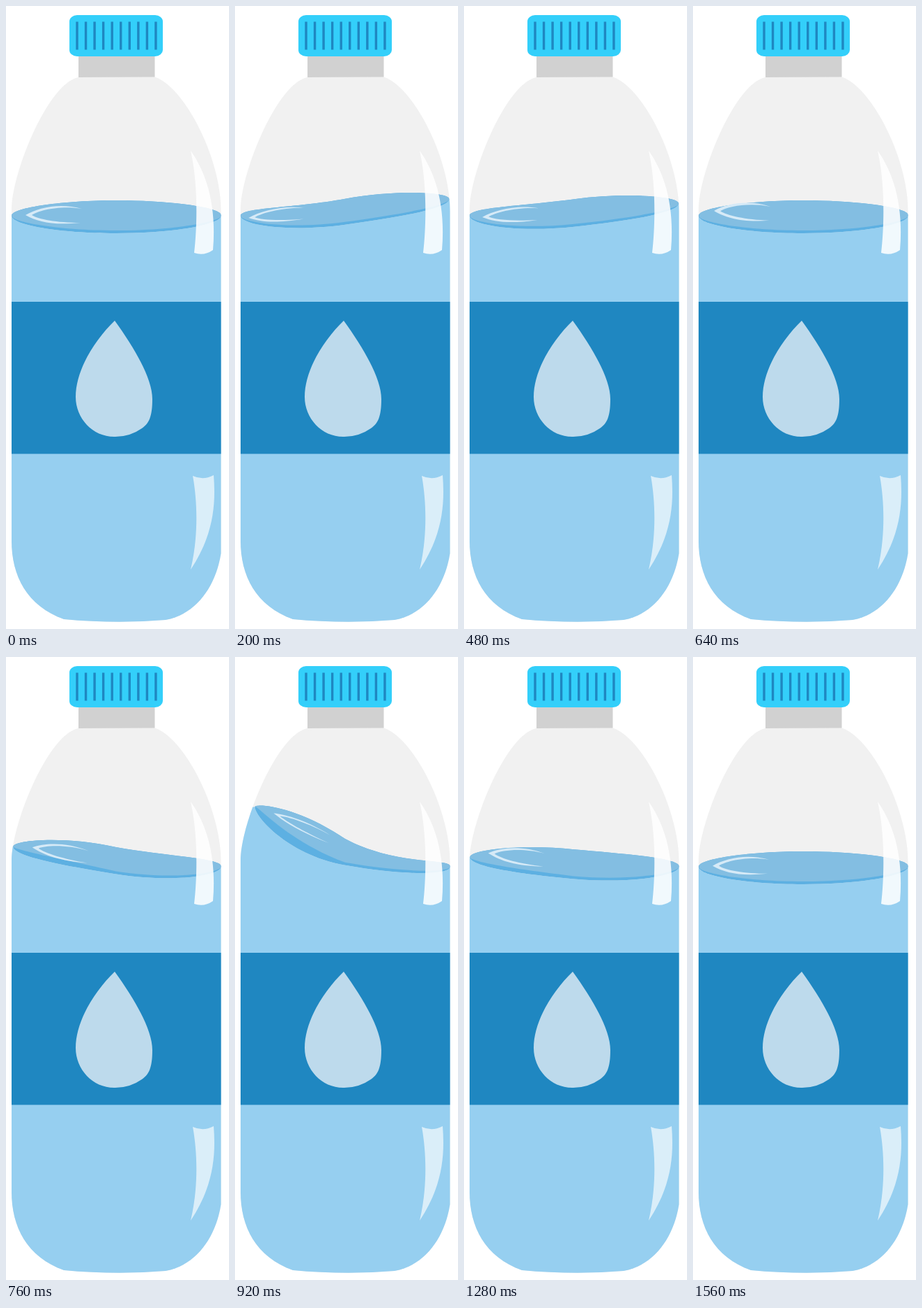
An HTML page that plays this animation: 320 px wide and 891 px high, repeating every 1.6 s.

```html
<!DOCTYPE html>
<html lang="en">
<head>
<meta charset="utf-8">
<title>Water bottle</title>
<style>
  html, body { margin: 0; width: 100%; height: 100%; overflow: hidden; background: #fff; }
  svg { display: block; width: 100%; height: 100%; }
</style>
</head>
<body>
<svg viewBox="0 0 320 891">
  <clipPath id="inside"><use href="#bottle"/></clipPath>
  <rect x="104" y="70" width="109.5" height="33" fill="#d1d1d1"/>
  <rect x="91" y="13" width="134" height="59" rx="11" ry="9" fill="#33cffa"/>
  <path id="ridges" stroke="#1f87c1" stroke-width="3.4"/>
  <path id="bottle" fill="#f1f1f1" d="M104 102L214 101.5C256 116 308.5 217 308.5 293V783C301 830 273 870 229 878Q158 884 83 877C30 858 8 815 8 765V290C8 240 60 110 104 102Z"/>
  <g clip-path="url(#inside)">
    <path id="water" fill="#96cff0"/>
    <path id="rim" fill="#5db0e2"/>
    <path id="surface" fill="#83bee2"/>
    <path id="glint" fill="#d6eaf7" d="M81-9C50-18 18-11 0 0C18 10 40 15 79 11C45 11 18 6 9 0C20-7 50-14 81-9Z"/>
  </g>
  <rect x="8" y="423" width="300.5" height="217.5" fill="#1f87c1"/>
  <path fill="#bddaec" d="M156 450C185 490 210 533 210 562C210 588 205 597 195 604Q178 616 157 616C125 617 100 590 100 559C100 520 128 477 156 450Z"/>
  <g fill="#fff">
    <path opacity=".87" d="M265 207C290 242 302 290 297 349Q284 358 270 353C275 310 275 250 265 207Z"/>
    <path opacity=".65" d="M268 672Q283 679 298 671C301 710 299 755 265 806C276 760 275 710 268 672Z"/>
  </g>
</svg>
<script>
const LOOP = 1600;
const set = (id, name, value) => document.getElementById(id).setAttribute(name, value);

// Rises from 0 to 1 at the peak, then falls back to 0
function swell(t, start, peak, end, power = 1.15) {
  const u = t < peak ? (t - start) / (peak - start) : (end - t) / (end - peak);
  return Math.max(0, u) ** power;
}

// left and right: how far each end of the surface has risen
function drawWater(left, right) {
  const rise = left + right, dir = left > right ? 1 : -1;
  const lx = 8 + .0028 * left ** 2, ly = 300 - left;
  const rx = 309 - .0028 * right ** 2, ry = 299.5 - right;

  const topY = 278 - .21 * left - .1 * right;
  const slope = .57 * rise * dir;
  const leftSlope = slope, rightSlope = slope * (dir > 0 ? .8 : 1);
  const lip = r => 12 - .08 * r;
  const top = `M${lx} ${ly}C${lx} ${ly - lip(left)} 85 ${topY - leftSlope} 158 ${topY}`
    + `C231 ${topY + rightSlope} ${rx} ${ry - lip(right)} ${rx} ${ry}`;

  const bend = (.6 * rise - .005 * rise ** 2) * dir;
  const bottom = (inset, thick) => {
    const y = 325 - .6 * rise + .0033 * rise ** 2;
    return `C${rx} ${ry + 13 - inset} 242 ${y + bend - inset} 158 ${y - inset}`
      + `C75 ${y - bend - thick} ${lx} ${ly + 13 - thick} ${lx} ${ly}`;
  };

  const outer = bottom(0, 0);
  set("rim", "d", top + outer + "Z");
  set("surface", "d", top + bottom(4, 4 + .18 * left) + "Z");
  set("water", "d", `M320 ${ry}L${rx} ${ry}${outer}L0 ${ly}V891H320Z`);
}

// The glint settles more slowly than the water
function drawGlint(t, left, right) {
  const lift = swell(t, 540, 925, LOOP, 1.9);
  const x = 28 + 28 * lift - 11 * swell(t, 0, 250, 540);
  const y = 299 - 77 * lift + .17 * right;
  const tilt = 37 * lift - .3 * right;
  const half = 10 - .045 * left - .1 * right;
  set("glint", "transform", `matrix(1 ${tilt / 80} 0 ${half / 10} ${x} ${y})`);
}

function frame() {
  const t = performance.now() % LOOP;
  const right = 46 * swell(t, 0, 360, 570);
  const left = 87 * swell(t, 660, 925, 1370);
  drawWater(left, right);
  drawGlint(t, left, right);
  requestAnimationFrame(frame);
}

set("ridges", "d", Array.from({ length: 10 }, (_, i) => `M${102 + 12.55 * i} 22.5V62.5`).join(""));
frame();
</script>
</body>
</html>
```
